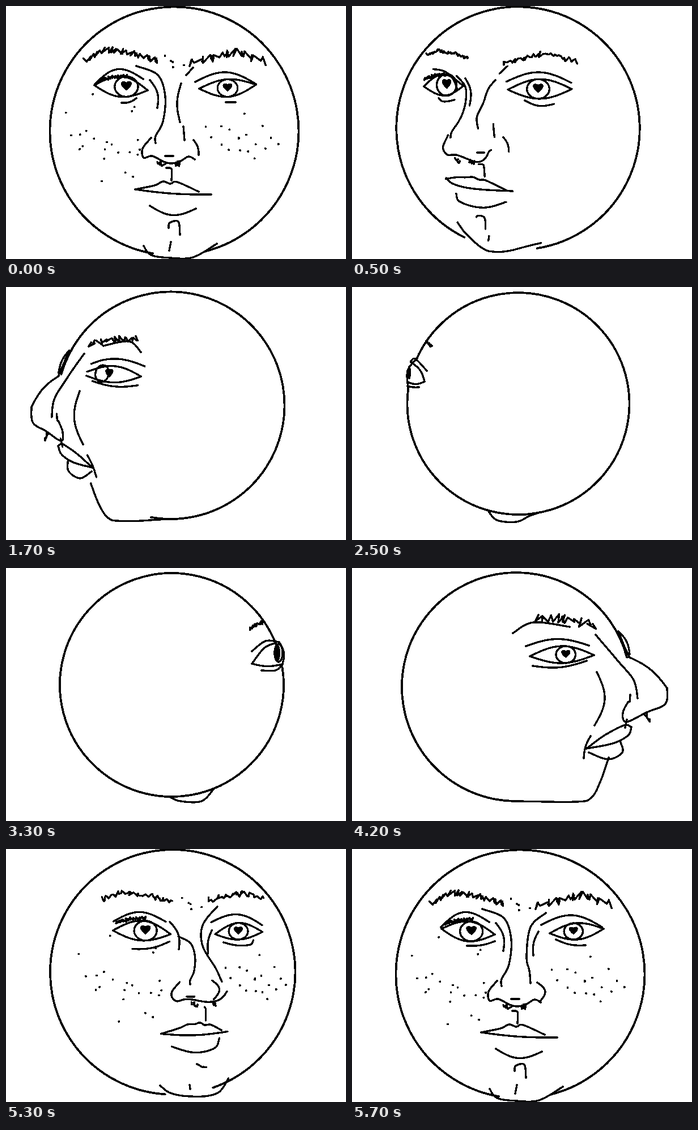
Animation of 600 by 447 pixels, one loop 5.8 s. Source, as an HTML page:

```html
<!DOCTYPE html>
<html lang="en">
<head>
<meta charset="utf-8">
<title>Turning head</title>
<style>
  html, body { margin: 0; width: 100%; height: 100%; overflow: hidden; background: #fff; }
  svg { display: block; width: 100%; height: 100%; }
  path { fill: none; stroke: #000; stroke-width: 3.4; stroke-linecap: round; stroke-linejoin: round; }
  #skull { stroke-width: 3.8; }
  #pupils { fill: #000; stroke-width: 2; }
  #dots { stroke-width: 4; }
</style>
</head>
<body>
<svg viewBox="0 0 600 447" shape-rendering="crispEdges">
  <path id="skull"/><path id="lines"/><path id="pupils"/><path id="dots"/>
</svg>
<script>
const LOOP = 5800, STEP = 100, RAD = Math.PI / 180;
const mix = (a, b, k) => a + (b - a) * k;
const clamp = (v, lo, hi) => Math.max(lo, Math.min(hi, v));

let seed = 7;
const random = () => (seed = seed * 16807 % 2147483647) / 2147483647;
const spray = () => random() * 2 - 1;

const steps = (n, f) => Array.from({ length: n + 1 }, (_, i) => f(i / n));

// Smooth curve through a few key points.
function line(...n) {
  const p = [];
  for (let i = 0; i < n.length; i += 2) p.push([n[i], n[i + 1]]);
  const out = [p[0]];
  for (let i = 1; i < p.length; i++) {
    const b = p[i - 1], c = p[i], a = p[i - 2] || b, d = p[i + 1] || c;
    for (let t = 1 / 8; t <= 1; t += 1 / 8) {
      out.push([0, 1].map(j => b[j] + t / 2 * (c[j] - a[j]
        + t * (2 * a[j] - 5 * b[j] + 4 * c[j] - d[j]
        + t * (3 * b[j] - 3 * c[j] + d[j] - a[j])))));
    }
  }
  return out;
}

// Bow between two points; a positive height bulges to the left of its heading.
function arc(x0, y0, x1, y1, h = 0) {
  const dx = x1 - x0, dy = y1 - y0, k = h / Math.hypot(dx, dy);
  return steps(16, t => {
    const lift = k * Math.sin(Math.PI * t);
    return [x0 + dx * t + dy * lift, y0 + dy * t - dx * lift];
  });
}

const oval = (x, y, rx, ry) => steps(24, t =>
  [x + rx * Math.sin(t * 2 * Math.PI), y - ry * Math.cos(t * 2 * Math.PI)]);

const heart = (x, y, rx, ry) => steps(24, t => {
  const a = t * 2 * Math.PI;
  return [x + rx * Math.sin(a) ** 3,
    y - ry * (13 * Math.cos(a) - 5 * Math.cos(2 * a) - 2 * Math.cos(3 * a)) / 15];
});

// Evenly spaced points along a polyline.
function resample(points, count = 60) {
  const reach = [0];
  for (let i = 1; i < points.length; i++) {
    const [x, y] = points[i - 1];
    reach.push(reach[i - 1] + Math.hypot(points[i][0] - x, points[i][1] - y));
  }
  const total = reach[reach.length - 1];
  let i = 1;
  return steps(count - 1, t => {
    while (i < points.length - 1 && reach[i] < total * t) i++;
    const k = (total * t - reach[i - 1]) / (reach[i] - reach[i - 1] || 1);
    return [0, 1].map(c => mix(points[i - 1][c], points[i][c], k));
  });
}

// Pencil hatching around a curve.
function scribble(spread, ...keys) {
  const path = line(...keys), [a, b] = [path[0], path[path.length - 1]];
  const length = Math.hypot(b[0] - a[0], b[1] - a[1]);
  return resample(path, Math.max(7, Math.round(length / spread * 1.9)))
    .map(([x, y], i) => [x + spray() * spread * 0.9,
      y + (i % 2 ? 1 : -1) * spread * mix(0.3, 1, random())]);
}

const scatter = (n, x, y, w, h) => Array.from({ length: n },
  () => [x + w * (spray() + spray()) / 2, y + h * (spray() + spray()) / 2]);

// Eyelids meet in two corners; the iris fills the opening between them.
function eye(side, x0, y0, x1, y1, up, down, look) {
  const x = mix(x0, x1, look), y = (y0 + y1 + down - up) / 2;
  const ry = (up + down) / 2, rx = Math.min(ry * 1.15, (x1 - x0) * 0.35);
  return {
    ['eye' + side]: [arc(x0, y0, x1, y1, up), arc(x0, y0, x1, y1, -down)],
    ['iris' + side]: [oval(x, y, rx, ry)],
    ['pupil' + side]: [heart(x, y - ry * 0.15, rx * 0.42, ry * 0.45)]
  };
}

const pose = (time, yaw, disc, gap, parts, back = false) => ({ time, yaw, disc, gap, parts, back });

const mirror = (p, time) => {
  const [cx, cy, r] = p.disc, parts = {};
  for (const name in p.parts) {
    const other = name.replace(/[LR]$/, c => c === 'L' ? 'R' : 'L');
    parts[other] = p.parts[name].map(s => s.map(([x, y]) => [2 * cx - x, y]).reverse());
  }
  return { ...p, time, yaw: 360 - p.yaw, gap: [540 - p.gap[1], 540 - p.gap[0]], parts };
};

const front = pose(0, 0, [297, 221, 219.5], [100, 436], {
  browL: [scribble(6, 142, 98, 168, 79, 215, 83, 268, 97)],
  browR: [scribble(7, 325, 101, 355, 93, 410, 82, 452, 98)],
  ...eye('L', 156, 140, 250, 149, 20, 16, 0.6),
  ...eye('R', 341, 146, 441, 139, 13, 18, 0.5),
  lidL: [arc(157, 138, 242, 129, 22)],
  lidR: [arc(334, 134, 441, 138, 19)],
  lashL: [scribble(3, 164, 132, 186, 126, 214, 124)],
  bagL: [arc(204, 171, 230, 163, -3)],
  bagR: [arc(388, 170, 405, 170)],
  bridgeL: [line(230, 106, 268, 122, 281, 160, 277, 204, 264, 230, 264, 242), arc(254, 131, 267, 180, 7)],
  bridgeR: [arc(309, 137, 307, 205, -6), arc(330, 109, 318, 122), arc(313, 213, 315, 237)],
  nose: [line(256, 233, 241, 252, 243, 268, 258, 265, 278, 275, 292, 278, 308, 274, 322, 266, 333, 271),
    arc(331, 237, 340, 263, 3), arc(281, 265, 295, 265)],
  nostril: [scribble(4, 270, 277, 278, 281), scribble(4, 299, 281, 308, 277)],
  philtrum: [line(283, 286, 292, 288, 292, 308)],
  lips: [line(228, 324, 262, 317, 277, 310, 290, 314, 302, 311, 340, 328),
    arc(228, 324, 362, 333, -3), arc(254, 353, 335, 358, -14)],
  dimple: [line(287, 392, 289, 383, 304, 381, 307, 404), arc(291, 417, 288, 432)],
  jaw: [line(243, 424, 256, 440, 290, 445, 330, 444, 372, 420)],
  spots: [[...scatter(22, 175, 235, 80, 80), ...scatter(18, 420, 230, 75, 60), ...scatter(5, 292, 100, 30, 14)]]
});

const left = pose(1100, 35, [288, 210, 209], [178, 460], {
  browL: [scribble(5, 126, 76, 130, 88)],
  browR: [scribble(7, 190, 105, 222, 97, 270, 88, 328, 101)],
  ...eye('L', 92, 145, 132, 132, 24, 18, 0.52),
  ...eye('R', 196, 150, 324, 156, 24, 15, 0.45),
  lidL: [line(127, 80, 131, 110, 131, 145, 118, 168), arc(104, 110, 130, 110, 1)],
  lidR: [arc(199, 133, 322, 133, 16)],
  bagL: [line(92, 153, 96, 166, 122, 169)],
  bagR: [arc(205, 163, 298, 177, -14)],
  bridgeL: [line(130, 145, 118, 168, 95, 195, 75, 208, 66, 222)],
  bridgeR: [line(186, 124, 164, 140, 146, 175, 120, 203, 121, 230)],
  cheek: [line(188, 196, 178, 212, 176, 248)],
  nose: [line(66, 222, 64, 248, 80, 257, 115, 265, 138, 273, 148, 259, 140, 235)],
  nostril: [scribble(4, 81, 263, 84, 271), scribble(5, 99, 267, 105, 278)],
  lips: [line(90, 284, 115, 283, 165, 309, 192, 323), line(92, 280, 92, 298, 120, 312, 190, 320),
    line(100, 305, 95, 326, 150, 341, 196, 332)],
  dimple: [arc(138, 350, 150, 382, 5), arc(183, 393, 184, 393), arc(215, 407, 216, 407)],
  jaw: [line(118, 332, 136, 358, 158, 408, 185, 420, 250, 416, 288, 417)]
});

const backLeft = pose(2500, 101, [293.5, 206, 196], [203, 548], {
  browR: [scribble(2, 131, 97, 140, 105)],
  lidR: [line(104, 131, 112, 127, 132, 148)],
  eyeR: [arc(104, 133, 128, 167, 5), arc(98, 168, 128, 167, -4)],
  pupilR: [oval(101, 151, 2, 11)],
  bagR: [arc(98, 175, 118, 177, -1)],
  bulge: [line(113, 128, 98, 148, 99, 178)],
  jaw: [line(240, 395, 256, 412, 290, 415, 312, 405, 326, 400)]
}, true);

const backRight = pose(3300, 259, [292.5, 206.5, 197.5], [-9, 339], {
  browL: [scribble(3, 429, 108, 446, 97, 455, 97)],
  lidL: [line(434, 147, 458, 129, 482, 131)],
  eyeL: [line(434, 169, 455, 142, 474, 133), arc(434, 169, 488, 170, -4)],
  irisL: [oval(481, 150, 7, 16)],
  pupilL: [oval(480, 150, 3, 13)],
  bagL: [line(451, 181, 475, 181, 487, 172)],
  bulge: [arc(482, 131, 487, 172, 6)],
  jaw: [line(290, 405, 308, 412, 345, 412, 367, 390)]
}, true);

const right = pose(4200, 309, [290, 210, 202], [90, 345], {
  browL: [scribble(8, 325, 90, 380, 90, 428, 104), line(284, 115, 320, 96, 384, 104)],
  ...eye('L', 314, 156, 427, 154, 17, 13, 0.56),
  lidL: [arc(307, 138, 418, 137, 12)],
  bagL: [arc(319, 173, 414, 164, -7)],
  eyeR: [arc(470, 112, 490, 152, 5), arc(471, 113, 489, 156, -1)],
  cheek: [arc(432, 184, 428, 278, 16)],
  bridgeL: [line(430, 118, 470, 165, 497, 198, 504, 230), arc(491, 224, 490, 236)],
  bridgeR: [arc(488, 157, 556, 212, 7)],
  nose: [line(487, 237, 478, 256, 484, 272, 520, 255, 553, 240, 556, 212)],
  nostril: [scribble(5, 517, 260, 524, 269)],
  philtrum: [arc(485, 268, 482, 282)],
  lips: [line(414, 319, 445, 296, 480, 278, 493, 281), line(414, 319, 460, 310, 487, 296, 493, 281),
    line(418, 326, 452, 338, 477, 326, 474, 308), arc(409, 336, 421, 297, 3)],
  jaw: [line(290, 412, 395, 413, 422, 406, 438, 378, 453, 335)]
});

const halfRight = pose(4900, 338, [291, 214, 213], [74, 415], {
  browL: [scribble(9, 195, 86, 235, 76, 280, 82, 322, 90)],
  browR: [scribble(9, 390, 80, 412, 77, 450, 75)],
  ...eye('L', 219, 147, 329, 150, 23, 12, 0.57),
  ...eye('R', 389, 152, 461, 152, 22, 8, 0.56),
  lidL: [arc(222, 118, 322, 128, 12)],
  lidR: [arc(390, 125, 463, 131, 14)],
  bagL: [arc(243, 182, 325, 164, -7)],
  bagR: [line(408, 170, 435, 173, 464, 167, 461, 152)],
  cheek: [arc(279, 212, 292, 225)],
  bridgeL: [arc(378, 203, 386, 236, 4)],
  bridgeR: [line(404, 90, 378, 135, 385, 172, 420, 200, 447, 232)],
  nose: [line(357, 237, 342, 258, 355, 270, 395, 262, 436, 262, 452, 250, 447, 232)],
  nostril: [scribble(4, 385, 268, 398, 274), scribble(4, 429, 265, 435, 272)],
  philtrum: [line(418, 272, 412, 282, 413, 298)],
  lips: [line(319, 329, 380, 304, 392, 309, 402, 302, 420, 312), arc(319, 329, 420, 312, -6),
    line(331, 345, 380, 351, 422, 336, 418, 310)],
  dimple: [line(386, 368, 390, 391, 400, 367), arc(357, 417, 362, 416)],
  jaw: [line(301, 412, 345, 428, 400, 425, 412, 412, 413, 390)]
});

const frontAgain = pose(5700, 360, front.disc, front.gap, {
  ...front.parts,
  ...eye('L', 158, 141, 252, 151, 18, 17, 0.56),
  ...eye('R', 349, 149, 444, 141, 14, 15, 0.44),
  bagL: [arc(203, 171, 252, 163, -3)],
  bagR: [arc(360, 160, 412, 170, -4)],
  bridgeR: [line(342, 113, 315, 138, 308, 190, 313, 215, 315, 237), arc(329, 146, 320, 188, -4)],
  nose: [front.parts.nose[0], arc(327, 236, 331, 270, 12), front.parts.nose[2]]
});

const poses = [front, left, mirror(right, 1500), backLeft, backRight, right, halfRight, frontAgain];

function blend(a, b, k) {
  const q = resample(b);
  return resample(a).map(([x, y], i) => [mix(x, q[i][0], k), mix(y, q[i][1], k)]);
}

// Carries a stroke around the ball by some degrees.
function turn(points, [cx, cy, r], [dx, dy, dr], degrees) {
  let seen = false;
  const moved = points.map(([x, y]) => {
    const v = clamp((y - cy) / r, -0.99, 0.99), w = Math.sqrt(1 - v * v);
    const lon = Math.asin(clamp((x - cx) / (r * w), -1, 1)) - degrees * RAD;
    if (Math.abs(lon) < Math.PI / 2) seen = true;
    return [dx + dr * w * Math.sin(clamp(lon, -Math.PI / 2, Math.PI / 2)), dy + dr * v];
  });
  return seen ? moved : null;
}

// Sinks a stroke into the outline on one side.
const sink = (points, [cx, cy, r], side, k) => points.map(([x, y]) =>
  [mix(x, cx + side * Math.sqrt(Math.max(0, r * r - (y - cy) ** 2)), k), y]);

const at = ([x, y]) => `${x.toFixed(1)} ${y.toFixed(1)}`;
const trace = points => 'M' + points.map(at).join('L');

function outline([cx, cy, r], [from, to]) {
  const end = Math.min(to, from + 359.9);
  const rim = a => at([cx + r * Math.cos(a * RAD), cy + r * Math.sin(a * RAD)]);
  return `M${rim(from)}A${r} ${r} 0 ${end - from > 180 ? 1 : 0} 1 ${rim(end)}`;
}

function draw(t) {
  const i = poses.findLastIndex(p => p.time <= t);
  const a = poses[i], b = poses[i + 1] || a;
  const k = a === b ? 0 : (t - a.time) / (b.time - a.time);
  const disc = a.disc.map((v, n) => mix(v, b.disc[n], k));
  const yaw = mix(a.yaw, b.yaw, k), side = yaw < 180 ? -1 : 1;
  const leaving = a.back !== b.back;
  const sunk = Math.min(1, (a.back ? 1 - k : k) / 0.63);

  const single = (s, owner) => {
    if (leaving && !owner.back) return sunk < 1 ? sink(s, disc, side, sunk) : null;
    if ((owner === a) !== (k < 0.5)) return null;
    return turn(s, owner.disc, disc, yaw - owner.yaw);
  };

  const ink = { lines: '', pupils: '', dots: '' };
  for (const name of new Set([...Object.keys(a.parts), ...Object.keys(b.parts)])) {
    const p = a.parts[name] || [], q = b.parts[name] || [];
    if (name === 'spots') {
      const owner = p.length ? a : b;
      if (Math.abs(yaw - owner.yaw) > 13) continue;
      for (const spot of owner.parts.spots[0]) {
        const moved = turn([spot], owner.disc, disc, yaw - owner.yaw);
        if (moved) ink.dots += `M${at(moved[0])}h.01`;
      }
      continue;
    }
    const layer = name.startsWith('pupil') ? 'pupils' : 'lines';
    for (let n = 0; n < Math.max(p.length, q.length); n++) {
      let s;
      if (k === 0) s = p[n];
      else if (p[n] && q[n]) s = blend(p[n], q[n], k);
      else s = p[n] ? single(p[n], a) : single(q[n], b);
      if (s) ink[layer] += trace(s);
    }
  }

  // The outline opens late towards a profile and closes early away from it.
  let open = side < 0 ? k * k : k * (2 - k);
  if (leaving) open = a.back ? 1 - sunk * sunk : sunk * sunk;
  const gap = a.back && b.back && k > 0 ? [0, 360] : a.gap.map((v, n) => mix(v, b.gap[n], open));
  ink.skull = outline(disc, gap);
  for (const id in ink) document.getElementById(id).setAttribute('d', ink[id]);
}

const start = performance.now();
let shown = -1;
function tick() {
  const t = Math.floor((performance.now() - start) % LOOP / STEP) * STEP;
  if (t !== shown) draw(shown = t);
  requestAnimationFrame(tick);
}
tick();
</script>
</body>
</html>
```
